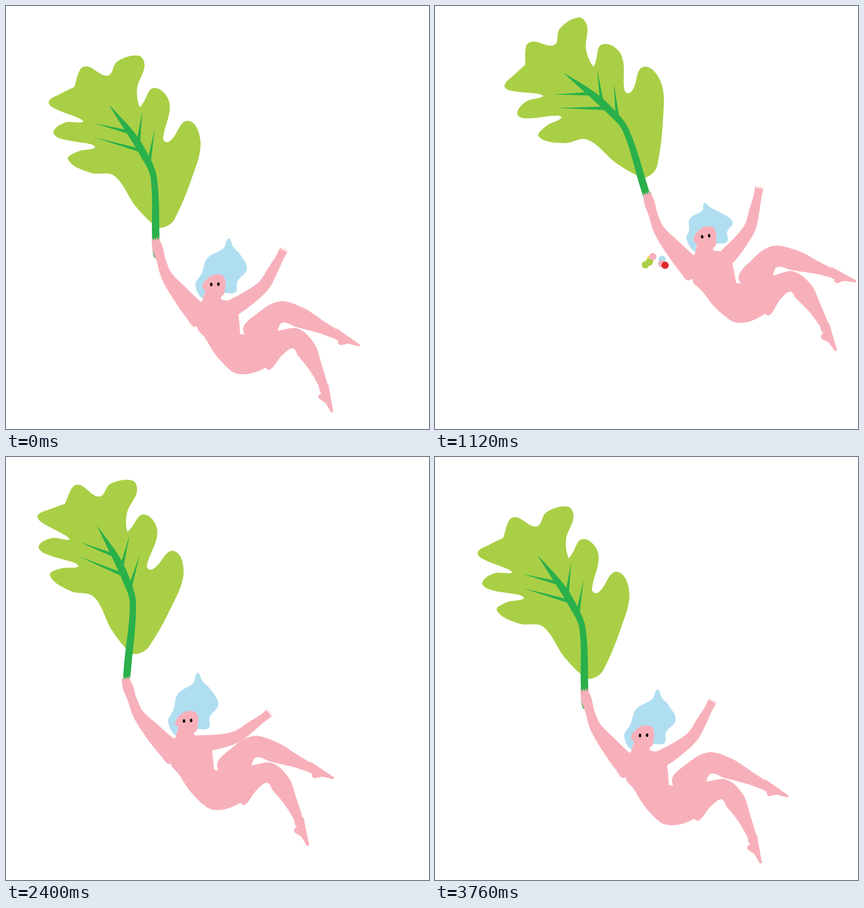
Animation of 748x748 px, one loop 3.8 s. Source, as an HTML page with a canvas:

```html
<!DOCTYPE html>
<html lang="en">
<head>
<meta charset="utf-8">
<title>Leaf glider</title>
<style>
html, body { margin: 0; width: 100%; height: 100%; overflow: hidden; background: #fff; }
canvas { display: block; }
</style>
</head>
<body>
<canvas id="stage" width="748" height="748"></canvas>
<script>
const ctx = document.getElementById('stage').getContext('2d');
const LOOP = 3800, STEP = 40;
const SKIN = '#f7b0ba', HAIR = '#b0def1', LEAF = '#a9cf46', STEM = '#2ab04b', RED = '#de2a27', YELLOW = '#f5e14b';

const points = text => text.trim().split(/\s+/).map(item => item.split(',').map(Number));
const rad = deg => deg * Math.PI / 180;

// Closed smooth curve; a repeated point makes a sharp corner.
function smooth(pts) {
  const path = new Path2D(), n = pts.length, at = i => pts[(i + n) % n];
  const dir = i => {
    const dx = at(i + 1)[0] - at(i - 1)[0], dy = at(i + 1)[1] - at(i - 1)[1];
    const len = Math.hypot(dx, dy) || 1;
    return [dx / len, dy / len];
  };
  path.moveTo(...pts[0]);
  for (let i = 0; i < n; i++) {
    const [ax, ay] = at(i), [bx, by] = at(i + 1), a = dir(i), b = dir(i + 1);
    const h = Math.hypot(bx - ax, by - ay) / 3;
    path.bezierCurveTo(ax + a[0] * h, ay + a[1] * h, bx - b[0] * h, by - b[1] * h, bx, by);
  }
  path.closePath();
  return path;
}

function polygon(pts) {
  const path = new Path2D();
  pts.forEach(([x, y]) => path.lineTo(x, y));
  path.closePath();
  return path;
}

// Tapered tube through joints given as x,y,radius.
function tube(text) {
  const joints = points(text), left = [], right = [];
  joints.forEach(([x, y, r], i) => {
    const a = joints[Math.max(i - 1, 0)], b = joints[Math.min(i + 1, joints.length - 1)];
    const angle = Math.atan2(b[1] - a[1], b[0] - a[0]);
    const nx = -Math.sin(angle) * r, ny = Math.cos(angle) * r;
    left.push([x + nx, y + ny]);
    right.unshift([x - nx, y - ny]);
  });
  return smooth([...left, ...right]);
}

// Copies a local shape to (x, y), turned by deg.
function turned(pts, x, y, deg) {
  const c = Math.cos(rad(deg)), s = Math.sin(rad(deg));
  return polygon(pts.map(([u, v]) => [x + u * c - v * s, y + u * s + v * c]));
}

const fingers = points('-6,-8');
fingers.length = 0;
for (let i = 0; i < 4; i++) {
  const v = -7.5 + 4 * i;
  fingers.push([1, v], [8 - Math.abs(i - 2), v + 1.5], [2, v + 3.5]);
}
fingers.push([-7, 6], [-7, -6]);
const footShape = points('-2,-8 48,-1 47,3 28,7 17,16 12,15 9,8 -2,8');

const leaf = smooth(points(`76,168 97,155 121,143 121,143 132,111 145,107 180,123 197,98 235,88 245,106
  232,145 236,178 242,172 262,145 289,171 278,234 284,241 294,235 322,203 344,240 328,306 298,377
  285,389 268,391 230,355 191,300 150,295 110,272 128,257 157,251 152,245 95,234 84,222 105,206
  136,205 130,199 82,179`));
const stem = tube('183,176,.3 222,227,6 243,261,6.5 261,302,5.5 265,412,6.5 266,444,4');
const veins = [[155, 207, 217, 223], [155, 232, 236, 255], [241, 186, 234, 241], [263, 217, 253, 276]]
  .map(([x, y, bx, by]) => turned([[0, 0], [Math.hypot(bx - x, by - y), -3.2], [Math.hypot(bx - x, by - y), 3.2]],
    x, y, Math.atan2(by - y, bx - x) * 180 / Math.PI));

const body = [
  smooth(points(`343,527 351,519 386,520 407,530 412,555 414,580 414,580 455,590 480,624 456,641 432,650
    408,650 393,641 370,616 352,587 338,568`)),
  smooth(points('350,525 352,503 347,498 352,486 369,475 386,480 386,508 380,516 385,526')),
  tube('440,590,25 463,558,23 487,541,19 520,551,18 560,569,11 584,581,8 592,585,7'),
  tube('450,605,38 484,595,22 512,588,18 531,608,18 547,638,12 560,668,8 564,682,7'),
  turned(footShape, 583, 578, 27),
  turned(footShape, 563, 673, 72)
];
const gripArm = [
  tube('265,417,7 275,452,8 284,477,10 307,508,15 335,541,19 348,555,18'),
  turned(fingers, 265, 416, -95)
];
const freeArm = [
  tube('490,434,5.5 484,445,7 472,467,9 456,494,10.5 428,517,13 402,533,15 390,538,13'),
  turned(fingers, 489, 435, -58)
];
const hairPoints = points(`395,411 401,425 413,438 426,465 409,487 406,506 385,507 352,507 348,518 335,493
  346,473 356,446 385,428 390,416`);

function ease(t, from, to) {
  const u = Math.min(1, Math.max(0, (t - from) / (to - from)));
  return (1 - Math.cos(Math.PI * u)) / 2;
}
const pulse = (t, start, peak, end) => ease(t, start, peak) - ease(t, peak, end);
// The main glide: out to one value, across to another, then home.
const glide = (t, a, b) => a * pulse(t, 0, 1280, 2920) + b * pulse(t, 1280, 2920, LOOP);

const BURST = { x: 390, y: 470, start: 1067, end: 1940, span: 693 };
const dots = [
  [YELLOW, -117, -299], [LEAF, -143, -225], [LEAF, -235, -162], [SKIN, -65, -349],
  [HAIR, 153, -289], [SKIN, 143, -188], [RED, 221, -151]
];

function fill(color, ...paths) {
  ctx.fillStyle = color;
  paths.forEach(path => ctx.fill(path));
}

// Draws with the rest-pose point (px, py) moved to (x, y) and turned there.
function placed(px, py, x, y, deg, draw) {
  ctx.save();
  ctx.translate(x, y);
  ctx.rotate(rad(deg));
  ctx.translate(-px, -py);
  draw();
  ctx.restore();
}

function ellipse(color, x, y, rx, ry) {
  ctx.fillStyle = color;
  ctx.beginPath();
  ctx.ellipse(x, y, rx, ry, 0, 0, Math.PI * 2);
  ctx.fill();
}

function drawDots(t) {
  if (t < BURST.start || t > BURST.end) return;
  const f = (t - BURST.start) / BURST.span;
  for (const [color, dx, dy] of dots) ellipse(color, BURST.x + dx * f, BURST.y + dy * f, 6.4, 6.4);
}

// Hair leans and squashes more the higher it is above the eyes.
function drawHair(lean, squash) {
  fill(HAIR, smooth(hairPoints.map(([x, y]) => {
    const w = Math.max(0, (492 - y) / 80);
    return [x - lean * w, y + squash * w];
  })));
}

function draw(t) {
  ctx.clearRect(0, 0, 748, 748);
  drawDots(t);

  const leafX = glide(t, 53, -47), leafY = glide(t, -65, -34) - 12 * pulse(t, 1200, 2050, 3400);
  placed(200.3, 200, 200.3 + leafX, 200 + leafY, glide(t, -16.3, 13.6), () => {
    fill(LEAF, leaf);
    fill(STEM, stem, ...veins);
  });

  const gripX = 265 + glide(t, 115, -103), gripY = 412 + glide(t, -84, -2);
  const gripTurn = -4.1 * pulse(t, 640, 1940, 3300);
  const c = Math.cos(rad(gripTurn)), s = Math.sin(rad(gripTurn));
  const lean = pulse(t, 200, 1440, 2800), bodyTurn = -7.3 * lean;
  const wave = 36 * pulse(t, 0, 640, 1300) - 27 * (ease(t, 640, 1300) - ease(t, 1450, 2760))
    + 36 * pulse(t, 1450, 2760, LOOP);
  const reach = -12 * pulse(t, 1120, 2200, LOOP);

  placed(345, 525, gripX + 80 * c - 113 * s, gripY + 80 * s + 113 * c, bodyTurn, () => {
    drawHair(24 * lean, glide(t, 23, -11));
    fill(SKIN, ...body);
    ellipse('#000', 363, 492.4, 2.2, 3.1);
    ellipse('#000', 375.6, 491.8, 2.2, 3.1);
    placed(400, 530, 400 + reach, 530, wave - bodyTurn, () => fill(SKIN, ...freeArm));
  });
  placed(265, 412, gripX, gripY, gripTurn, () => fill(SKIN, ...gripArm));
}

function frame(now) {
  draw(Math.floor(now % LOOP / STEP) * STEP);
  requestAnimationFrame(frame);
}

draw(0);
requestAnimationFrame(frame);
</script>
</body>
</html>
```
